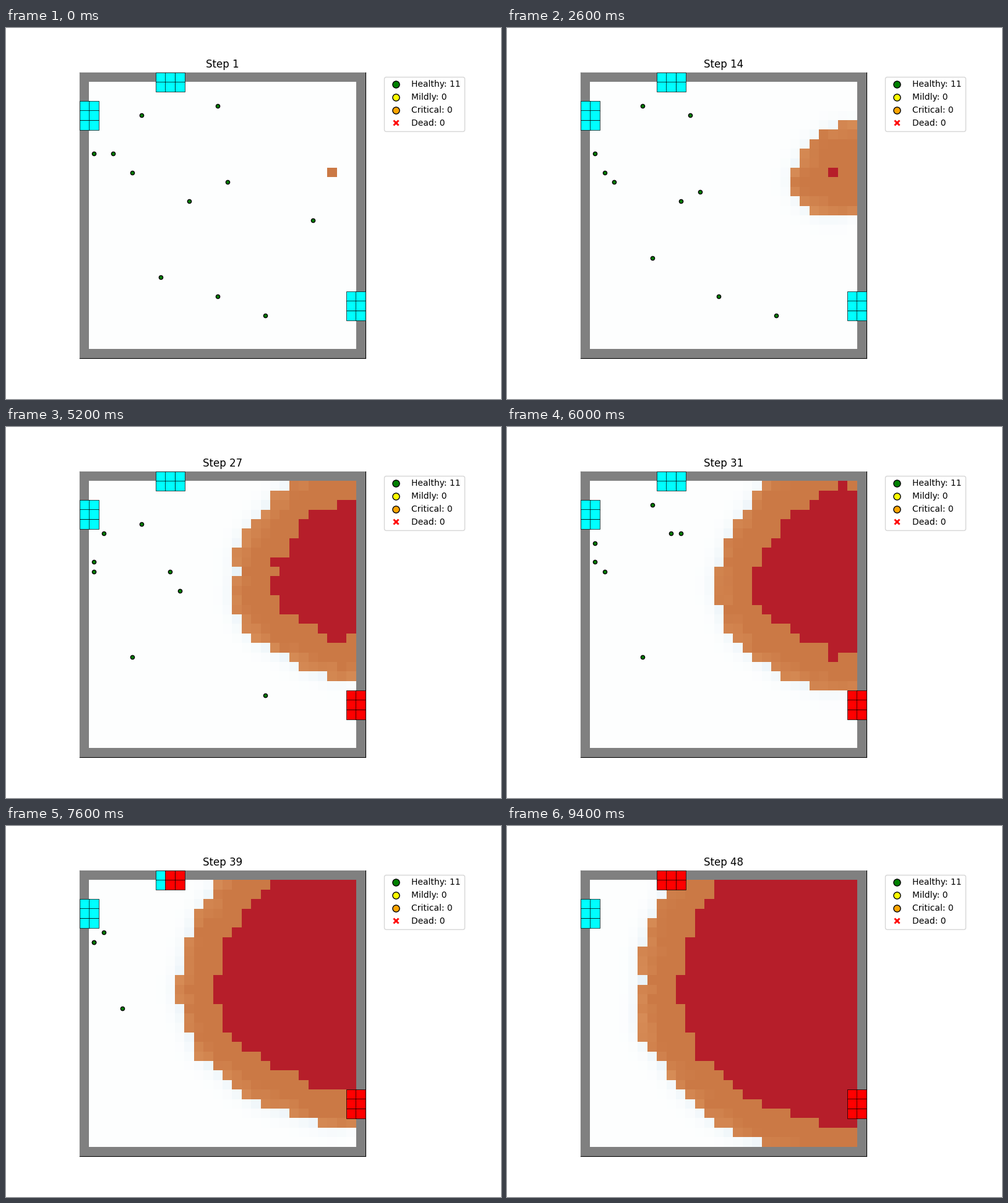
Recreate the animation shown at these times as a matplotlib script. Size 800 by 600 pixels, loop 9.6 s.

```python
import numpy as np
import matplotlib.pyplot as plt
from matplotlib.animation import FuncAnimation
from matplotlib.lines import Line2D

N = 30            # cells per side, walls included
STEPS = 48
SEED_CELL = (10, 26)
FIRE_SPEED = 0.467   # cells per step
BURN_TIME = 9        # steps until a burning cell turns deep red
WAY_STEP = 21        # people gather at their way point, then head for a door

WALL = np.array([128, 128, 128])
AIR = np.array([253, 254, 254])
SMOKE = np.array([206, 227, 240])
FLAME_NEW = np.array([215, 141, 87])
FLAME = np.array([203, 121, 69])
EMBER = np.array([182, 30, 42])

rng = np.random.default_rng(7)

# --- fire: it runs outward at one speed, with a delay that varies by heading ---

rows, cols = np.mgrid[:N, :N]
down, left = rows - SEED_CELL[0], SEED_CELL[1] - cols
heading = np.degrees(np.arctan2(down, left))   # 0 is left, 90 is down
delay = np.interp(heading, [-100, -60, -30, 0, 20, 50, 75, 95],
                  [2, 5.5, 6.5, 5, 3, 5, 5, 3])
arrival = delay + np.hypot(down, left) / FIRE_SPEED
arrival += rng.uniform(-1, 1, (N, N))
arrival[SEED_CELL] = 1

inside = np.zeros((N, N), bool)
inside[1:-1, 1:-1] = True
arrival[~inside] = np.inf

tint = rng.uniform(0, 0.35, (N, N))
tint[SEED_CELL] = 1

kernel = np.exp(-np.arange(-4, 5) ** 2 / (2 * 1.4 ** 2))
kernel /= kernel.sum()


def blur(grid):
    for axis in (0, 1):
        grid = np.apply_along_axis(np.convolve, axis, grid, kernel, "same")
    return grid


def mix(a, b, t):
    return a + (b - a) * t[..., None]


def grid_image(step):
    burning = arrival <= step
    smoke = np.clip(blur(burning.astype(float)) / 0.85, 0, 1) ** 2
    age = np.where(burning, step - arrival, 0)
    flame = mix(FLAME_NEW, FLAME, np.clip(age / 4 + tint, 0, 1))
    img = mix(AIR, SMOKE, smoke)
    img[burning] = flame[burning]
    img[arrival + BURN_TIME <= step] = EMBER
    img[~inside] = WALL
    return np.round(img).astype(np.uint8)


# --- doors: left, top, width, height, first closing step, steps per column ---

DOORS = [(8, 0, 3, 2, 33, 5), (0, 3, 2, 3, np.inf, 0), (28, 23, 2, 3, 25, 0)]

door_cells, closing = [], []
for x, y, width, height, first, pace in DOORS:
    for col in range(x, x + width):
        for row in range(y, y + height):
            door_cells.append((col, row))
            closing.append(first + pace * (x + width - 1 - col))
door_cells, closing = np.array(door_cells), np.array(closing)
exits = door_cells[inside[door_cells[:, 1], door_cells[:, 0]]]

# --- people: start cell, way point, step of leaving ---

PEOPLE = [
    ((6, 4), (6, 4), 38),
    ((14, 3), (10, 4), 26),
    ((1, 8), (1, 7), 46),
    ((3, 8), (1, 9), 45),
    ((5, 10), (1, 10), 46),
    ((15, 11), (10, 12), 33),
    ((11, 13), (10, 13), 33),
    ((24, 15), (28, 23), 13),
    ((8, 21), (5, 19), 46),
    ((14, 23), (14, 23), 29),
    ((19, 25), (21, 25), 26),
]
sway = rng.choice([-1, 0, 0, 0, 1], (STEPS + 1, len(PEOPLE), 2))
sway[[1, WAY_STEP]] = 0


def person_at(step, start, way, leave):
    start, way = np.array(start), np.array(way)
    meet = min(WAY_STEP, leave)
    if step <= meet:
        return start + (way - start) * (step - 1) / (meet - 1)
    goal = exits[np.hypot(*(exits - way).T).argmin()]
    return way + (goal - way) * ((step - meet) / (leave - meet)) ** 3


def people_at(step):
    spots = [np.clip(np.round(person_at(step, *person)) + shift, 1, N - 2)
             for person, shift in zip(PEOPLE, sway[step]) if step < person[2]]
    return np.array(spots).reshape(-1, 2)


# --- stage ---

fig, ax = plt.subplots(figsize=(8, 6), dpi=100)
fig.subplots_adjust(right=0.75)
image = ax.imshow(grid_image(1), interpolation="nearest", zorder=3)
ax.set_xticks([])
ax.set_yticks([])
title = ax.set_title("Step 1")


def door_tiles(color):
    return ax.scatter([], [], s=120, marker="s", c=color, edgecolors="black",
                      linewidths=0.5, zorder=4)


open_tiles, closed_tiles = door_tiles("cyan"), door_tiles("red")
dots = ax.scatter([], [], s=20, c="green", edgecolors="black", zorder=5)
ax.set_xlim(-0.5, N - 0.5)
ax.set_ylim(N - 0.5, -0.5)


def key(marker, face, edge, label):
    return Line2D([0], [0], marker=marker, color="w", markerfacecolor=face,
                  markeredgecolor=edge, markersize=8, label=label)


ax.legend(handles=[key("o", "green", "black", "Healthy: 11"),
                   key("o", "yellow", "black", "Mildly: 0"),
                   key("o", "orange", "black", "Critical: 0"),
                   key("X", "red", "w", "Dead: 0")],
          loc="upper left", bbox_to_anchor=(1.05, 1))


def draw(i):
    step = i + 1
    title.set_text(f"Step {step}")
    image.set_data(grid_image(step))
    dots.set_offsets(people_at(step))
    closed = closing <= step
    open_tiles.set_offsets(door_cells[~closed])
    closed_tiles.set_offsets(door_cells[closed])
    return image, open_tiles, closed_tiles, dots, title


anim = FuncAnimation(fig, draw, frames=STEPS, init_func=lambda: draw(0),
                     interval=200, repeat=True, repeat_delay=0)
plt.show()
```
